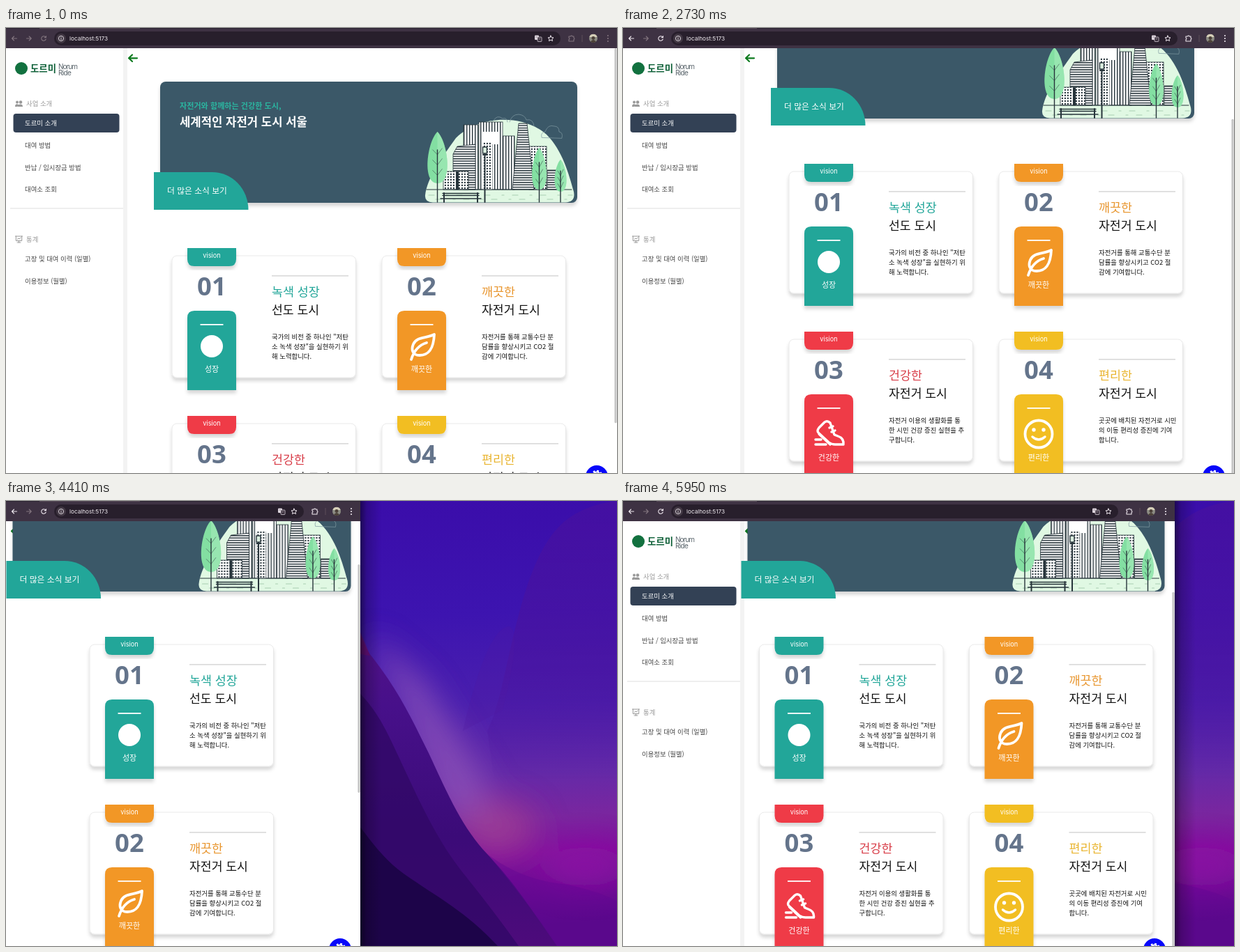
Write an HTML page that moves like this. It is 876x639 px and loops after 6930 ms.

```html
<!DOCTYPE html>
<html lang="ko">
<head>
<meta charset="utf-8">
<title>자전거 도시</title>
<style>
html, body { margin: 0; width: 100%; height: 100%; overflow: hidden; background: #fff; }
svg { display: block; width: 100%; height: 100%; }
text { font-family: "Noto Sans CJK KR", "Noto Sans CJK", "Noto Sans", sans-serif; white-space: pre; }
.latin { font-family: Inter, Roboto, sans-serif; }
.num { font-family: "Noto Sans", "Open Sans", sans-serif; }
.line { fill: none; stroke-linecap: round; stroke-linejoin: round; }
</style>
</head>
<body>
<svg id="stage" viewBox="0 0 876 639"></svg>
<script>
const LOOP = 6930, STEP = 70, VIEW = 640, SIDE = 168, TOP = 29;

const text = (x, cy, size, str, fill, more = '') =>
  `<text x="${x}" y="${(cy + size * 0.37).toFixed(2)}" font-size="${size}" fill="${fill}" ${more}>${str}</text>`;
const rect = (x, y, w, h, fill, more = '') =>
  `<rect x="${x}" y="${y}" width="${w}" height="${h}" fill="${fill}" ${more}/>`;
const line = (d, color, width = 1, more = '') =>
  `<path class="line" d="${d}" stroke="${color}" stroke-width="${width}" ${more}/>`;
const shape = (d, fill, more = '') => `<path d="${d}" fill="${fill}" ${more}/>`;
const circle = (x, y, r, fill, more = '') => `<circle cx="${x}" cy="${y}" r="${r}" fill="${fill}" ${more}/>`;
const gradient = (id, dir, stops) =>
  `<linearGradient id="${id}" ${dir}>` +
  stops.map(([o, c, a = 1]) => `<stop offset="${o}" stop-color="${c}" stop-opacity="${a}"/>`).join('') +
  '</linearGradient>';
const pattern = (id, w, h, body) =>
  `<pattern id="${id}" width="${w}" height="${h}" patternUnits="userSpaceOnUse">${rect(0, 0, w, h, '#fff')}${body}</pattern>`;

const INK = '#27343b', TEAL = '#22a699';
const DOWN = 'x1="0" y1="0" x2="0" y2="1"';

const defs = `<defs>
  ${gradient('sky', 'x1="0" y1="0" x2="0.06" y2="1"', [[0, '#3a0ca9'], [0.3, '#3d14b0'], [0.5, '#4a1fae'],
    [0.66, '#642aa8'], [0.76, '#7a269f'], [0.84, '#800f9c'], [1, '#560a88']])}
  ${gradient('ridge', DOWN, [[0, '#5b1289'], [0.35, '#47108a'], [0.7, '#3b0b78'], [1, '#4d0b7b']])}
  ${gradient('swirl', DOWN, [[0, '#4c129b', 0.55], [0.6, '#4c129b', 0.5], [1, '#4c129b', 0]])}
  ${gradient('shade', '', [[0, '#000', 0.5], [0.3, '#000', 0.2], [1, '#000', 0]])}
  ${pattern('cols', 4, 8, rect(0, 0, 1.4, 8, INK))}
  ${pattern('rows', 8, 3.4, rect(0, 0, 8, 1.5, INK))}
  ${pattern('grid', 4, 4, rect(0.9, 0.8, 2, 2.2, INK))}
  <filter id="soft" x="-50%" y="-50%" width="200%" height="200%"><feGaussianBlur stdDeviation="22"/></filter>
  <filter id="drop" x="-10%" y="-10%" width="120%" height="130%">
    <feDropShadow dx="0" dy="4.5" stdDeviation="2.8" flood-color="#000" flood-opacity="0.16"/></filter>
  <clipPath id="winClip"><rect id="winBox" width="876" height="639"/></clipPath>
  <clipPath id="mainClip"><rect id="mainBox" y="${TOP}" width="876" height="610"/></clipPath>
</defs>`;

const wallpaper = rect(0, 0, 876, 639, 'url(#sky)') +
  '<g filter="url(#soft)">' +
  shape('M520 190L600 260 680 390 720 480 630 450Z', '#8f55b8', 'opacity=".75"') +
  '<ellipse cx="705" cy="470" rx="55" ry="40" fill="#a03c92" opacity=".75"/>' +
  '<ellipse cx="830" cy="525" rx="65" ry="28" fill="#920aa8" opacity=".7"/></g>' +
  shape('M690 330C722 270 730 90 800 30Q830 5 876 0V400H700Z', 'url(#swirl)') +
  shape('M655 330Q690 180 722 180Q740 190 712 300Z', '#51189f', 'opacity=".25"') +
  shape('M440 110L465 130C500 150 505 200 525 224C565 275 585 320 606 362C635 425 655 470 690 507C735 555 755 590 790 639H440Z', 'url(#ridge)') +
  shape('M440 115L465 132Q495 150 522 222Q490 220 465 185Z', '#700f72', 'opacity=".65"') +
  shape('M440 230Q510 260 545 330C580 400 610 480 660 540Q700 590 735 639H440Z', '#310867', 'opacity=".8"') +
  shape('M440 400C500 440 520 500 570 535S660 590 705 639H440Z', '#1d0449') +
  shape('M690 507Q740 545 800 550Q850 560 876 575V639H790Q755 585 690 507Z', '#630793', 'opacity=".4"');

const item = (cy, str) => text(27, cy, 9.4, str, '#454545', 'font-weight="500"');
const sidebar = `<g id="sidebar">
  ${rect(168, TOP, 6, 610, '#f3f3f3')}
  ${circle(22, 58, 9, '#12713f')}
  ${text(35, 58.5, 13.4, '도르미', '#0e6038', 'font-weight="800"')}
  ${text(75, 55.6, 10, 'Norum', '#59646b', 'class="latin" letter-spacing="-1"')}
  ${text(75, 63.8, 10, 'Ride', '#59646b', 'class="latin" letter-spacing="-.7"')}
  ${circle(16, 106.5, 2, '#999')}${circle(21, 106.5, 2.3, '#999')}
  ${shape('M13 113Q13 109 16 109.3L18 110 16.5 113ZM17 113Q17 109.6 20.5 109.6T24 113Z', '#999')}
  ${text(29, 109, 9.4, '사업 소개', '#999')}
  ${rect(10.5, 123, 152, 27, '#334155', 'rx="4"')}
  ${text(27, 136.5, 9.4, '도르미 소개', '#fff', 'font-weight="500"')}
  ${item(168.5, '대여 방법')}${item(200.5, '반납 / 임시장금 방법')}${item(231.7, '대여소 조회')}
  ${rect(6, 258.5, 162, 1, '#ddd')}
  ${line('M13.5 299H23.5M14.3 299V305.5H22.7V299M18.5 305.5V308M16 308H21M16.2 303.5L18 302 19.2 303 21 301', '#999')}
  ${text(29, 303.5, 9.4, '통계', '#999')}
  ${item(332, '고장 및 대여 이력 (일별)')}${item(363.5, '이용정보 (월별)')}
</g>`;

const tree = (x, top, rx, bottom) => {
  const h = bottom - top;
  const right = `C${x + rx} ${top + h * 0.2} ${x + rx * 1.5} ${bottom} ${x} ${bottom}`;
  const twig = [0.35, 0.55, 0.75].map(k => {
    const y = top + h * k;
    return `M${x - rx * 0.45} ${y}L${x} ${y + 7}L${x + rx * 0.45} ${y - 2}`;
  }).join('');
  return shape(`M${x} ${top}${right}C${x - rx * 1.5} ${bottom} ${x - rx} ${top + h * 0.2} ${x} ${top}Z`, '#83dfa2') +
    shape(`M${x} ${top}${right}Z`, '#a5ecb9', 'opacity=".6"') +
    line(twig, INK, 0.5) + line(`M${x} ${top + h * 0.35}V250`, INK, 1.4);
};
const block = (x, y, w, fill) => rect(x, y, w, 232 - y, `url(#${fill})`, `stroke="${INK}" stroke-width=".8"`);

const city = `
  ${shape('M601 240C604 216 622 190 645 158C680 124 742 124 775 153C798 176 807 210 814 235Q817 250 802 250.5H612Q600 250 601 240Z', '#e0f8e3')}
  ${line('M694 142Q691 134 699 133Q704 124 712 130Q718 128 719 135M722 135Q725 124 735 124Q744 125 746 132Q756 130 757 141M768 157Q766 150 773 149Q777 138 786 141Q793 141 793 149Q799 150 797 158Z', '#809aa3', 0.7)}
  ${block(776, 204, 14, 'rows')}
  ${block(750, 170, 25, 'grid')}
  ${block(712, 155, 17, 'cols')}
  ${block(656, 139, 21, 'cols')}
  ${shape('M641 232V181L647 170 673 167V232Z', 'url(#rows)', `stroke="${INK}" stroke-width=".8"`)}
  ${block(678, 135, 34, 'cols')}${rect(683, 149, 24, 18, '#fff')}${rect(684, 164, 13, 68, 'url(#grid)')}
  ${shape('M735 137H747L757 232H726Z', 'url(#rows)', `stroke="${INK}" stroke-width=".8"`)}
  ${block(627, 206, 36, 'grid')}${rect(645, 206, 4, 26, INK)}
  ${line('M603 232H811', INK, 1)}
  ${line('M606 240H812M616 246H805', '#a9cfb1', 1.2, 'stroke-dasharray="8 17 3 12"')}
  ${tree(618.5, 149, 15, 223)}${tree(764.5, 172, 11, 232)}${tree(795, 189, 9, 235)}
  ${line('M686.5 250V180M684 182H689', INK, 2)}${rect(683.5, 171, 6, 9, '#dcefe0', `stroke="${INK}" stroke-width="1.4"`)}
  ${line('M626 237.5H678M626 240.5H678M623 245H681', INK, 1.4)}${line('M628 237V250M676 237V250', INK, 2)}`;

const banner = `
  <rect id="bannerBox" y="77" height="174" rx="8" fill="#3b5967" filter="url(#drop)"/>
  <g id="bannerLeft">
    ${text(28, 112, 11.1, '자전거와 함께하는 건강한 도시,', '#2bb5a0', 'font-weight="700"')}
    ${text(28, 135, 16.7, '세계적인 자전거 도시 서울', '#fff', 'font-weight="700"')}
  </g>
  <g id="city">${city}</g>
  <g id="more">
    ${shape('M-9 207H74.5A52 54 0 0 1 126.5 261H-9Z', TEAL)}
    ${text(10, 233.7, 11.8, '더 많은 소식 보기', '#fff')}
  </g>`;

// Icons are centred on the coloured tile, 51px below its top edge.
const icons = [
  circle(0, 0, 16, '#fff'),
  line('M18 -17C17 4 10 13 -3 13C-14 13 -15 4 -12 -3C-7 -14 6 -11 18 -17ZM-15 19C-11 6 -3 -2 7 -5', '#fff', 3.8),
  line('M-6 -11L-14 -3Q-18 2 -14 5L0 18Q4 21 9 21H21Q22 12 13 9L8 7 2 -10Q-2 -14 -6 -11ZM1 -3L6 -5M4 3L9 1M-14 6L2 21M-19 14H-11M-19 21H-4', '#fff', 3.4),
  line('M-9 10Q0 18 9 10', '#fff', 3.4) + circle(0, 6, 19.5, 'none', 'stroke="#fff" stroke-width="3.8"') +
    circle(-7, 0, 2.7, '#fff') + circle(7, 0, 2.7, '#fff')
];
// Tile colour, title colour, label, label position, title, subtitle, body.
const cards = [
  [TEAL, TEAL, '성장', 162.5, '녹색 성장', '선도 도시', ['국가의 비전 중 하나인 "저탄', '소 녹색 성장"을 실현하기 위', '해 노력합니다.']],
  ['#f29727', '#e8962f', '깨끗한', 162.5, '깨끗한', '자전거 도시', ['자전거를 통해 교통수단 분', '담률을 향상시키고 CO2 절', '감에 기여합니다.']],
  ['#ef3a47', '#d83d48', '건강한', 169.5, '건강한', '자전거 도시', ['자전거 이용의 생활화를 통', '한 시민 건강 증진 실현을 추', '구합니다.']],
  ['#f2be22', '#e9b531', '편리한', 169.5, '편리한', '자전거 도시', ['곳곳에 배치된 자전거로 시민', '의 이동 편리성 증진에 기여', '합니다.']]
];
const mid = 'text-anchor="middle"';
const card = ([color, ink, label, labelY, title, sub, body], i) => `<g class="card">
  ${rect(0, 0, 263.5, 175, '#fff', 'rx="7" stroke="#e4e4e4" stroke-width=".8" filter="url(#drop)"')}
  ${shape('M22 -11H92V5Q92 15 82 15H32Q22 15 22 5Z', color, 'filter="url(#drop)"')}
  ${text(57, -0.4, 9.2, 'vision', '#fff', `class="latin" ${mid}`)}
  <text class="num" x="57" y="57" font-size="36.5" font-weight="700" fill="#64748b" ${mid}>0${i + 1}</text>
  ${shape('M22 193V89Q22 79 32 79H82Q92 79 92 89V193Z', color, 'filter="url(#drop)"')}
  ${rect(40.5, 98, 33, 1.8, '#fff')}
  <g transform="translate(57 130)">${icons[i]}</g>
  ${text(57, labelY, 11, label, '#fff', `font-weight="500" ${mid}`)}
  ${rect(143, 28.3, 110, 1.2, '#ccc')}
  ${text(143, 52, 17.4, title, ink)}
  ${text(143, 78, 17.2, sub, '#111')}
  ${body.map((s, k) => text(143, 116.5 + k * 14.2, 9.4, s, '#111', 'font-weight="500"')).join('')}
</g>`;

const main = `<g clip-path="url(#mainClip)">
  <g id="back">${line('M20 43.3H8.5M13 38.5L8 43.3 13 48', '#0c7a1e', 2.2)}</g>
  <g id="content">${banner}${cards.map(card).join('')}</g>
</g>`;

const toolbar = `
  ${rect(0, 0, 876, TOP, '#3e3243')}${rect(0, 0, 876, 1, '#2a2230')}${rect(48, 0, 144, 1.2, '#514553')}
  <rect id="pill" x="69" y="5" height="20" rx="10" fill="#281f2c"/>
  ${circle(79, 15, 7, '#413743')}${circle(79, 15, 3.6, 'none', 'stroke="#e6dfe6" stroke-width=".9"')}
  ${line('M79 14.8V16.8M79 13.2V13.3', '#e6dfe6', 0.9)}
  ${text(91, 15, 8.2, 'localhost:5173', '#f2edf2', 'class="latin"')}
  ${line('M36 15H29.5M33.2 12L36.2 15 33.2 18', '#82757f', 1.1)}
  <g class="tool">
    ${line('M8.5 15H15.5M11.5 12L8.5 15 11.5 18', 'currentColor', 1.1)}
    ${line('M57 13.5A3.3 3.3 0 1 0 57.2 16M57.4 11.5V13.8H55', 'currentColor', 1.1)}
  </g>
  <g id="tools">
    ${rect(-118, 10.5, 6, 6.5, '#ddd5dd', 'rx="1"')}${rect(-114, 13, 6, 6.5, '#281f2c', 'rx="1" stroke="#ddd5dd" stroke-width=".8"')}
    ${line('M-116.5 13H-114M-112.5 15H-109.5M-111 14.5Q-111 17 -112.5 18M-111.5 16L-109.6 18', '#8d818d', 0.7)}
    ${line('M-95 11L-93.8 13.6 -91 13.9 -93.1 15.8 -92.5 18.6 -95 17.2 -97.5 18.6 -96.9 15.8 -99 13.9 -96.2 13.6Z', '#eee7ee', 1)}
    <g class="tool">
      ${line('M-69 12H-66.5A1.3 1.3 0 0 1 -64 12H-62V14A1.3 1.3 0 0 1 -62 16.5V19H-69V16.5A1.3 1.3 0 0 0 -69 14Z', 'currentColor', 1.1)}
      ${[11, 15, 19].map(y => circle(-13, y, 1.05, 'currentColor')).join('')}
    </g>
    ${rect(-50.5, 10, 1, 10, '#5c4f5a')}
    ${circle(-34, 15, 6, '#8c8c83')}${shape('M-39.7 13A6 6 0 0 1 -28.3 13Z', '#d5cfb8')}
    ${circle(-34, 14.5, 2.4, '#4b4038')}${shape('M-38 19.5Q-34 14.5 -30 19.5Q-34 22.5 -38 19.5Z', '#4b4038')}
  </g>`;

const stage = document.getElementById('stage');
stage.innerHTML = defs + wallpaper +
  `<rect id="edge" y="0" width="30" height="639" fill="url(#shade)"/>
  <g clip-path="url(#winClip)">${rect(0, 0, 876, 639, '#fff')}${sidebar}${main}
    <rect id="thumb" width="3.2" rx="1.6" fill="#c6c6c6"/>
    <g id="fab">${circle(0, 644, 16, '#0808fa')}${circle(0, 643, 5.5, 'none', 'stroke="#fff" stroke-width="1.8"')}
      ${circle(0, 643, 7.2, 'none', 'stroke="#fff" stroke-width="2.2" stroke-dasharray="2.8 2.85"')}</g>
    ${toolbar}
  </g>`;

const $ = id => document.getElementById(id);
const cardEls = [...document.querySelectorAll('.card')];
const toolEls = [...document.querySelectorAll('.tool')];
const move = (el, x, y = 0) => el.setAttribute('transform', `translate(${x} ${y})`);
const set = (id, attrs) => { for (const k in attrs) $(id).setAttribute(k, attrs[k]); };

function track(keys, t) {
  let [t0, v0] = keys[0];
  for (const [t1, v1] of keys) {
    if (t < t1) return v0 + (v1 - v0) * Math.max(0, (t - t0) / (t1 - t0));
    [t0, v0] = [t1, v1];
  }
  return v0;
}
const smooth = (a, b, t) => {
  const k = Math.min(1, Math.max(0, (t - a) / (b - a)));
  return k * k * (3 - 2 * k);
};

const SCROLL = [[210, 0], [280, 6], [350, 28], [490, 92], [560, 114], [630, 126], [700, 132], [770, 134],
  [910, 133], [980, 131], [1120, 125], [1330, 121]];
const SHRINK = [[3570, 876], [3640, 858], [4060, 648], [4270, 565], [4340, 530], [4480, 486], [4620, 465]];

function draw(time) {
  const t = Math.floor(time / STEP) * STEP;
  const width = track(SHRINK, t) + 326 * smooth(5250, 5880, t);
  const scroll = track(SCROLL, t);
  const open = width >= 565;
  const left = open ? SIDE : 0;
  const area = width - 4 - left;
  const center = left + area / 2;
  const two = area > 603;

  set('winBox', { width });
  set('mainBox', { x: left, width: width - left });
  set('edge', { x: width });
  $('sidebar').style.display = open ? '' : 'none';
  move($('back'), left);

  const bannerW = Math.min(598, area - 19), bannerX = center - bannerW / 2;
  move($('content'), 0, -scroll);
  set('bannerBox', { x: bannerX, width: bannerW });
  move($('bannerLeft'), bannerX);
  move($('more'), bannerX);
  move($('city'), bannerX + bannerW - 819);
  cardEls.forEach((el, i) => {
    const x = two ? center + (i % 2 ? 19 : -282) : center - 132;
    move(el, x, 327 + 241 * (two ? i >> 1 : i));
  });

  const range = two ? 121 : 609, total = VIEW + range;
  set('thumb', { x: width - 3.6, y: TOP + VIEW * Math.min(scroll, 121) / total, height: VIEW * VIEW / total });
  set('pill', { width: width - 150 });
  move($('tools'), width);
  move($('fab'), width - 29);
  toolEls.forEach(el => el.style.color = t >= 2730 ? '#eee7ee' : '#82757f');
}

const start = performance.now();
function tick() {
  draw((performance.now() - start) % LOOP);
  requestAnimationFrame(tick);
}
tick();
</script>
</body>
</html>
```
